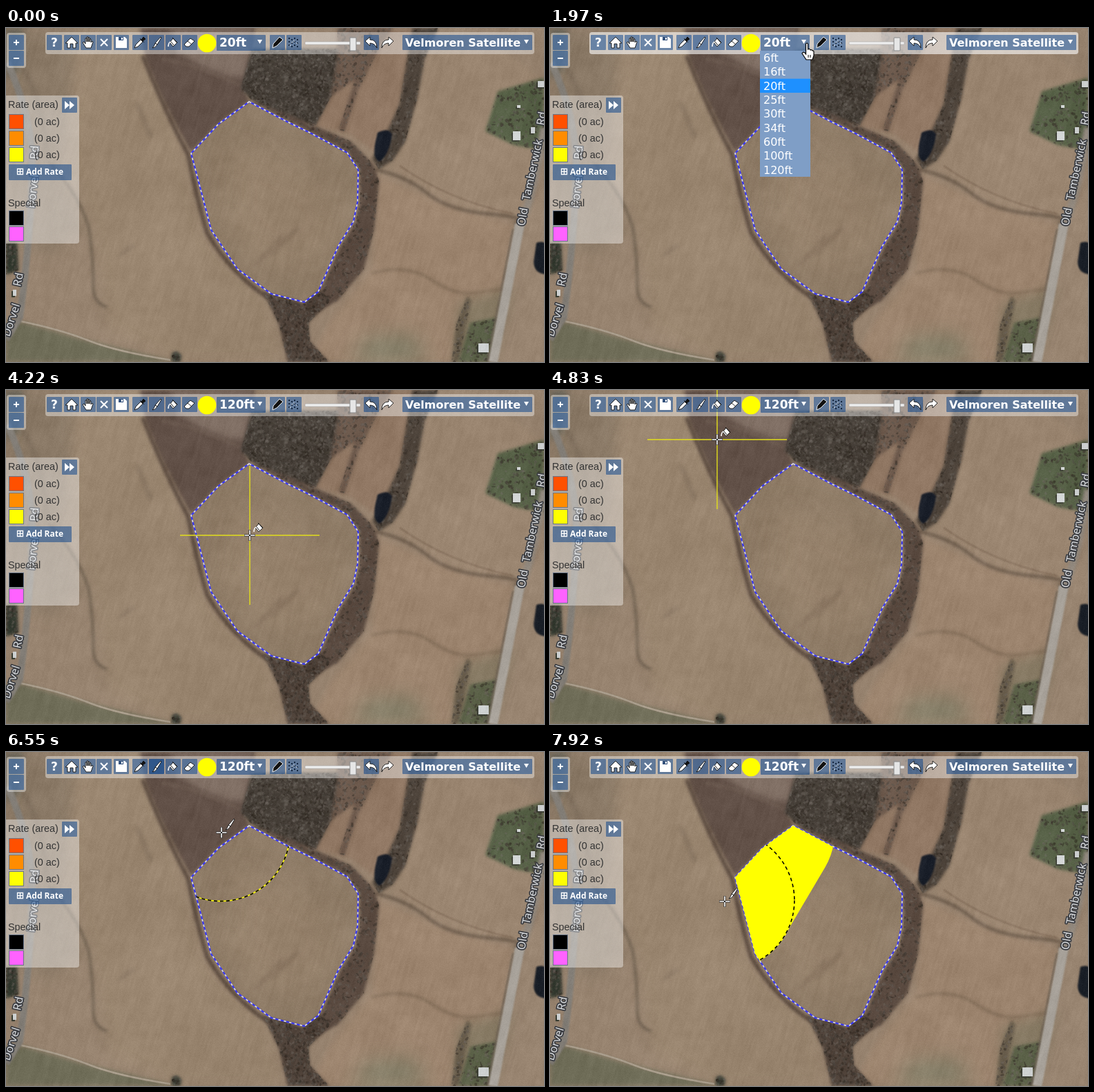
An HTML page with a canvas that plays this animation: 779x485 px, repeating every 8 s.

```html
<!DOCTYPE html>
<html lang="en">
<head>
<meta charset="utf-8">
<title>Field rate painting</title>
<style>
  html, body { margin: 0; width: 100%; height: 100%; overflow: hidden; background: #96826f; }
  canvas, svg { position: absolute; left: 0; top: 0; width: 779px; height: 485px; }
  .panel { fill: #fff; fill-opacity: .4; }
  .panel.on { fill-opacity: .6; }
  .btn { fill: #003c88; fill-opacity: .5; }
  .btn.on { fill-opacity: .7; }
  .bold { font: bold 17px "DejaVu Sans", sans-serif; fill: #fff; }
  .item { font: 16px "DejaVu Sans", sans-serif; fill: #fff; }
  .label { font: 14.4px "Liberation Sans", sans-serif; fill: #333; }
  .small { font: bold 12px "Noto Sans", sans-serif; fill: #fff; }
  .icon { fill: #fff; stroke: #111; stroke-width: .9; stroke-linejoin: round; }
  .line { fill: none; stroke: #fff; stroke-width: 2; }
</style>
</head>
<body>
<canvas id="land" width="779" height="485"></canvas>
<svg id="stage" viewBox="0 0 779 485"></svg>
<script>
const $ = id => document.getElementById(id);

// ---------- aerial view ----------
const ctx = $('land').getContext('2d');
const FIELD = 'M352 107L407 136L442 153L494 181L510 206L509 253L503 281L481 317L452 383L432 398L384 386L335 350L297 293L282 235L268 182L308 139Z';
let seed = 7;
const random = () => (seed = seed * 16807 % 2147483647) / 2147483647;

function area(d, color, blur = 2) {
  ctx.filter = `blur(${blur}px)`;
  ctx.fillStyle = color;
  ctx.fill(new Path2D(d));
}
function track(d, color, width, blur = 1) {
  ctx.filter = `blur(${blur}px)`;
  ctx.strokeStyle = color;
  ctx.lineWidth = width;
  ctx.stroke(new Path2D(d));
}
function woods(d, x, y, w, h, count, color = '#443d36') {
  area(d, color, 2);
  ctx.filter = 'none';
  ctx.save();
  ctx.clip(new Path2D(d));
  for (let i = 0; i < count; i++) {
    const v = 30 + random() * 75;
    ctx.fillStyle = `rgba(${v + 7},${v},${v - 7},.45)`;
    ctx.beginPath();
    ctx.ellipse(x + random() * w, y + random() * h, 1 + random() * 2.5, .8 + random() * 1.5, random() * 3, 0, 7);
    ctx.fill();
  }
  ctx.restore();
}
function houses(...spots) {
  ctx.filter = 'none';
  for (const [x, y, w, h] of spots) {
    ctx.fillStyle = '#3d4035';
    ctx.fillRect(x - 2, y + 2, w, h);
    ctx.fillStyle = '#cfd2d2';
    ctx.fillRect(x, y, w, h);
  }
}
function roadName(text, x, y, angle) {
  ctx.save();
  ctx.filter = 'none';
  ctx.translate(x, y);
  ctx.rotate(angle * Math.PI / 180);
  ctx.font = '16px "Noto Sans", sans-serif';
  ctx.lineJoin = 'round';
  ctx.lineWidth = 3.5;
  ctx.strokeStyle = '#3b3d42';
  ctx.strokeText(text, 0, 0);
  ctx.fillStyle = '#dcdee0';
  ctx.fillText(text, 0, 0);
  ctx.restore();
}
const hash = (x, y) => { const n = Math.sin(x * 127.1 + y * 311.7) * 43758.5453; return n - Math.floor(n); };
function noise(x, y) {
  const i = Math.floor(x), j = Math.floor(y), u = x - i, v = y - j;
  const top = hash(i, j) * (1 - u) + hash(i + 1, j) * u;
  const low = hash(i, j + 1) * (1 - u) + hash(i + 1, j + 1) * u;
  return top * (1 - v) + low * v - .5;
}
function grain() {
  const image = ctx.getImageData(0, 0, 779, 485), p = image.data;
  for (let y = 0, k = 0; y < 485; y++) for (let x = 0; x < 779; x++, k += 4) {
    const n = noise(x / 45, y / 45) * 9 + noise(x / 10, y / 10) * 7 +
      noise((x + y * .3) / 3, y / 24) * 7 + (hash(x, y) - .5) * 8;
    for (let c = 0; c < 3; c++) p[k + c] += n;
  }
  ctx.putImageData(image, 0, 0);
}

function paintLand() {
  ctx.filter = 'none';
  ctx.fillStyle = '#97836f';
  ctx.fillRect(0, 0, 779, 485);
  area('M0 0H120L105 100L75 200L110 290L60 330L0 300Z', '#8a7966', 10);
  area('M100 0H195L250 150L290 300L385 400L400 485H245L150 440L125 300L90 200Z', '#99856f', 8);
  area('M0 0H25L20 60L0 75Z', '#6a665a', 5);
  area(FIELD, '#8f7c67', 2);
  area('M320 180Q400 170 460 230T430 350Q350 350 320 280Z', '#95816b', 18);
  area('M194 0H360L345 92L352 106L308 138L268 180L246 140L222 92L202 45Z', '#604f46', 2);
  area('M240 0H360L347 70L325 72L282 54L244 32Z', '#7d6c61', 4);
  track('M225 45Q270 50 340 84', '#6d5c51', 3, 2);
  area('M480 0H600L580 80L545 190L500 155L445 142L470 90Z', '#8f7662', 3);
  area('M610 36L700 18L779 75L760 260L735 278L640 255L560 205L585 130Z', '#9a8570', 3);
  area('M540 215L640 258L735 285L700 485H440L470 425L530 350Z', '#9c846e', 4);
  area('M520 450L590 445L610 485H500Z', '#85806a', 14);
  area('M655 400L735 375L705 485H650Z', '#877a64', 8);

  // Hedges and ditches
  track('M198 40Q232 125 264 184Q274 240 291 297Q325 356 380 392', '#5a4a3f', 6, 2);
  track('M62 195Q105 240 120 290Q127 340 126 370T146 405', '#655849', 3, 2);
  track('M25 60Q55 110 60 190', '#776858', 4, 3);
  track('M532 205Q580 215 610 240T700 270T736 284', '#655546', 4, 2);
  track('M530 356Q580 342 615 365T675 385T725 378', '#7d6955', 3, 2);
  track('M570 200Q640 250 735 270', '#806b58', 2, 1);
  track('M385 330Q410 300 425 290M360 345Q390 315 400 300', '#7d6956', 4, 3);
  track('M165 330L185 315M190 110L210 160', '#806e5c', 4, 3);
  woods('M356 30H485L478 85L448 142L405 130L355 104L340 88Z', 340, 30, 150, 115, 1900);
  woods('M480 0H560L535 40L510 90L490 150L482 148L505 75L470 100L480 45Z', 470, 0, 100, 150, 500, '#6a574a');
  woods('M588 0H626L606 45L596 100L578 165L560 192L540 205L530 190L552 150L570 110L580 50Z', 528, 0, 100, 205, 800, '#4c4239');
  woods('M355 106L410 126L500 165L532 198L540 222L533 292L518 350L480 396L437 420L432 402L455 383L484 318L506 282L513 250L512 205L495 180Z', 355, 100, 190, 325, 2200, '#5a4a40');
  woods('M372 383L432 400L455 380L470 396L438 428L440 455L468 485H408L395 430Z', 370, 380, 100, 105, 800, '#51443b');
  woods('M645 485L652 430L668 390L674 395L664 440L656 485Z', 640, 385, 40, 100, 140, '#675c4b');

  // Water, yards and roads
  area('M538 152Q553 144 559 154Q555 184 541 194Q530 190 535 165Z', '#161b25', 1);
  area('M768 312Q785 305 785 330V358Q765 358 764 340Z', '#171c24', 1);
  woods('M712 92L779 72V178L735 170L694 150Z', 694, 72, 85, 106, 260, '#566046');
  area('M0 426L28 428L110 452L238 483V485H0Z', '#6f6d58', 3);
  woods('M672 428L712 420L700 485H655Z', 655, 420, 57, 65, 130, '#5b6148');
  woods('M0 312H16L18 352L0 358Z', 0, 312, 20, 46, 60, '#343a30');
  woods('M240 473Q248 466 254 476L252 485H240Z', 240, 468, 14, 17, 20, '#40443a');
  track('M22 426Q80 438 120 454T238 482', '#a89c8b', 2.5, .6);
  track('M2 50Q38 130 38 200Q36 300 20 420L0 452', '#827d76', 10, 1);
  track('M779 145Q760 260 742 292', '#8f867c', 11, 2);
  track('M744 285L705 485', '#a9a39b', 14, 1);
  track('M734 292L697 485', '#6e6255', 2, 1);
  houses([734, 150, 11, 13], [770, 77, 12, 9], [760, 144, 6, 9], [684, 458, 15, 13], [740, 112, 5, 4], [10, 380, 5, 9]);
  grain();
  roadName('Dorvel', 41, 262, -83);
  roadName('Rd', 46, 191, -86);
  roadName('Dorvel', 5, 449, -72);
  roadName('Rd', 21, 376, -78);
  roadName('Old', 751, 288, -80);
  roadName('Tamberwick', 758, 251, -78);
  roadName('Rd', 779, 142, -80);
}

// ---------- interface ----------
const SIZES = [6, 16, 20, 25, 30, 34, 60, 100, 120];
const ROW = 183 / 9;
const icon = {
  help: '<text class="bold" x="11" y="17" text-anchor="middle">?</text>',
  home: '<path class="icon" d="M2 12L11 3L20 12H17V19H13V13H9V19H5V12Z"/>',
  hand: '<path class="icon" d="M8 19L3 11L5 10L7 13V5H9V10V3H11V10V4H13V10V6H15V11L17 9L18 10L15 19Z"/>',
  clear: '<path class="line" d="M6 6L16 16M16 6L6 16"/>',
  save: '<path fill="#fff" d="M3 3H16L19 6V19H3Z"/><path fill="#36537d" d="M7 3H14V8H7ZM11 4H13V7H11Z" fill-rule="evenodd"/>',
  dropper: '<path class="icon" d="M3 19L5 14L12 7L15 10L8 17Z"/><path class="icon" d="M11 5L17 11M13 7L16 3L19 6L15 9Z" style="fill:#111"/>',
  brush: '<path class="icon" d="M17 3L18 4L12 14L9 12Z"/><path class="icon" d="M9 12L12 14Q9 19 5 19Q8 16 9 12Z"/>',
  bucket: '<path class="icon" d="M11 5L17 11L11 17L6 11Z"/><path d="M10 4L17 12M8 10L12 15" stroke="#111" fill="none"/><path d="M7 10Q4 12 4 17" stroke="#fff" stroke-width="1.5" fill="none"/>',
  eraser: '<path class="icon" d="M3 14L12 5L18 9L10 17H6Z"/><path class="icon" d="M8 9L14 14"/>',
  marker: '<path class="icon" d="M4 19L5 13L14 3L19 7L10 16Z" style="fill:#111;stroke:#fff"/>',
  dots: [4, 8, 12, 16].map((x, i) => `<path d="M${x} ${4 + i % 2 * 2}V19" stroke="#14263f" stroke-width="2" stroke-dasharray="2 3"/>`).join('') + '<path d="M5 16L10 8L16 13" stroke="#fff" stroke-dasharray="2 3" fill="none"/>',
  undo: '<path class="icon" d="M2 9L9 3V7Q19 7 19 19Q16 12 9 12V16Z"/>',
  redo: '<path class="icon" d="M20 9L13 3V7Q3 7 3 19Q6 12 13 12V16Z"/>'
};
const rect = (x, y, w, h, extra) => `<rect x="${x}" y="${y}" width="${w}" height="${h}" ${extra}/>`;
const text = (cls, x, y, s, extra = '') => `<text class="${cls}" x="${x}" y="${y}" ${extra}>${s}</text>`;
const button = (x, y, w, h, id = '') => rect(x, y, w, h, `rx="1" class="btn" ${id && `id="${id}"`}`);
const place = (name, center) => `<g transform="translate(${center - 11} 10)">${icon[name]}</g>`;
const tool = (name, center) => button(center - 11, 10, 22, 22, name) + place(name, center);
const arrow = (x, y) => `<path fill="#fff" d="M${x - 3} ${y}h7l-3.5 6z"/>`;
const swatch = (y, color) => rect(4.5, y + .5, 21, 21, `fill="${color}" stroke="#69768a"`);

const tools = Object.entries({ help: 70, home: 95, hand: 119, clear: 142, save: 167, dropper: 194, brush: 218,
  bucket: 242, eraser: 266, marker: 393, dots: 417, undo: 529 }).map(([n, x]) => tool(n, x)).join('');

$('stage').innerHTML = `
  <clipPath id="inside"><path d="${FIELD}"/></clipPath>
  <g fill="none">
    <path d="${FIELD}" stroke="#3838f4" stroke-width="2.2"/>
    <path d="${FIELD}" stroke="#e9e6c6" stroke-width="1.6" stroke-dasharray="3.5 4.5"/>
    <g clip-path="url(#inside)">
      <path id="paint" stroke="#ff0" stroke-width="200" stroke-linecap="round" stroke-linejoin="round"/>
      <g id="ring" stroke-width="1.6"><circle r="100" stroke="#ff0"/><circle r="100" stroke="#000" stroke-dasharray="5 4"/></g>
    </g>
    <path id="cross" stroke="#e2de1c" stroke-width="1.4"/>
  </g>
  ${rect(57, 6, 708, 32, 'rx="4" class="panel" id="bar"')}
  ${tools}${place('redo', 552)}
  <circle cx="291" cy="22" r="13.3" fill="#ff0"/>
  ${button(305, 10, 71, 23)}${text('bold', 309, 27, '', 'id="sizeText"')}${arrow(367, 17)}
  ${rect(433, 20, 80, 4, 'rx="1" fill="#eee" stroke="#aaa" stroke-width=".6"')}
  ${rect(498, 14, 9, 19, 'rx="1" fill="#e6e6e6" stroke="#888"')}
  ${button(574, 10, 188, 22)}${text('bold', 578, 27, 'Velmoren Satellite', 'style="font-size:16px"')}${arrow(753, 17)}
  ${rect(1, 7, 28, 51, 'rx="4" class="panel"')}${button(4, 10, 22, 22)}${button(4, 33, 22, 22)}
  <path class="line" d="M11 21H19M15 17V25M11 44H19"/>
  ${rect(-4, 98, 110, 215, 'rx="4" class="panel"')}
  ${text('label', 3, 116, 'Rate (area)')}${button(81, 101, 22, 22)}
  <path fill="#fff" d="M85 106L92 112L85 118ZM92 106L99 112L92 118Z"/>
  ${['#ff5000', '#ff8c00', '#ffff00'].map((c, i) => swatch(125 + i * 24, c) + text('label', 41, 141 + i * 24, '(0 ac)')).join('')}
  ${button(4, 198, 91, 23)}
  <path d="M16.5 204.5h8v8h-8zM20.5 204.5v8M16.5 208.5h8" stroke="#fff" stroke-width="1.3" fill="none"/>
  ${text('small', 29, 213, 'Add Rate')}
  ${text('label', 3, 259, 'Special')}${swatch(265, '#000')}${swatch(288, '#ff62ff')}
  <g id="menu">${rect(304, 33, 73, 183, 'fill="#7f9ec6"')}${rect(304, 0, 73, ROW, 'id="choice" fill="#1e90ff"')}
    ${SIZES.map((s, i) => text('item', 309, 49 + i * ROW, s + 'ft')).join('')}</g>
  <g id="pointer"><path d="M-1.5 1Q0-1 1.5 1V9Q4 7.5 5 10Q7 9 8 11Q10 10.5 10 13V18L8 24H-1L-7 15Q-6 12-3 14L-1.5 16Z" fill="#fff" stroke="#000" stroke-width="1.2"/><path d="M2 17V21M5 17V21" stroke="#000"/></g>
  <g id="target">
    <path d="M-8 0H8M0-8V8" stroke="#222" stroke-width="3"/><path d="M-7.5 0H-1M1 0H7.5M0-7.5V-1M0 1V7.5" stroke="#fff" stroke-width="1.6"/>
    <g id="bucketTip" transform="translate(2 -22)">${icon.bucket}</g><g id="brushTip" transform="translate(1 -23)">${icon.brush}</g>
  </g>`;

// ---------- motion ----------
const LOOP = 8000, STEP = 77;
const PRESS = 6610, START = [312, 117];
const PATH = [
  [660, 425, 482], [1430, 375, 23], [1650, 372, 22], [2280, 372, 22], [2740, 358, 196], [3350, 358, 196],
  [3440, 355, 200], [4140, 355, 200], [4220, 353, 211], [4380, 363, 230], [4830, 242, 72], [5000, 227, 38],
  [5370, 218, 22], [5690, 218, 22], [5770, 234, 50], [5920, 266, 98], [6550, ...START], [6930, ...START],
  [7010, 311, 118], [7080, 307, 123], [7760, 265, 196], [7920, 253, 217], [LOOP, 253, 217]
];

// The pointer is sampled in even steps along each stretch.
function position(t) {
  const i = PATH.findIndex(k => k[0] > t);
  if (i < 1) return [PATH[0][1], PATH[0][2]];
  const [t0, x0, y0] = PATH[i - 1], [t1, x1, y1] = PATH[i];
  const n = Math.max(1, Math.round((t1 - t0) / STEP));
  const p = Math.floor((t - t0) / (t1 - t0) * n + 1e-6) / n;
  return [x0 + (x1 - x0) * p, y0 + (y1 - y0) * p];
}
const show = (id, on) => $(id).setAttribute('display', on ? 'inline' : 'none');
const move = (id, x, y) => $(id).setAttribute('transform', `translate(${x} ${y})`);
const light = (id, on) => $(id).classList.toggle('on', on);

function draw(t) {
  const [x, y] = position(t);
  const present = t >= 660, menu = t >= 1970 && t < 3350;
  const overBar = present && (menu || y < 38), onMap = present && !overBar;
  const brush = t >= 5600, size = t < 3350 ? 20 : 120;

  show('menu', menu);
  const row = y < 33 ? 2 : Math.min(8, Math.floor((y - 33) / ROW));
  $('choice').setAttribute('y', 33 + row * ROW);
  $('sizeText').textContent = size + 'ft';

  light('bar', overBar);
  light('brush', t >= 5370 && t < PRESS);

  show('pointer', overBar);
  show('target', onMap);
  show('bucketTip', !brush);
  show('brushTip', brush);
  move('pointer', x, y);
  move('target', x, y);

  const r = size / 120 * 101;
  show('cross', onMap && !brush);
  $('cross').setAttribute('d', `M${x - r} ${y}h${2 * r}M${x} ${y - r}v${2 * r}`);

  // The ring trails the brush slightly.
  const [oldX, oldY] = position(t - STEP);
  show('ring', onMap && brush);
  move('ring', x + (oldX - x) * .15, y + (oldY - y) * .15);
  show('paint', t >= PRESS);
  $('paint').setAttribute('d', `M${START}L${x} ${y}`);
}

paintLand();
const began = performance.now();
function frame() {
  draw((performance.now() - began) % LOOP);
  requestAnimationFrame(frame);
}
frame();
</script>
</body>
</html>
```
